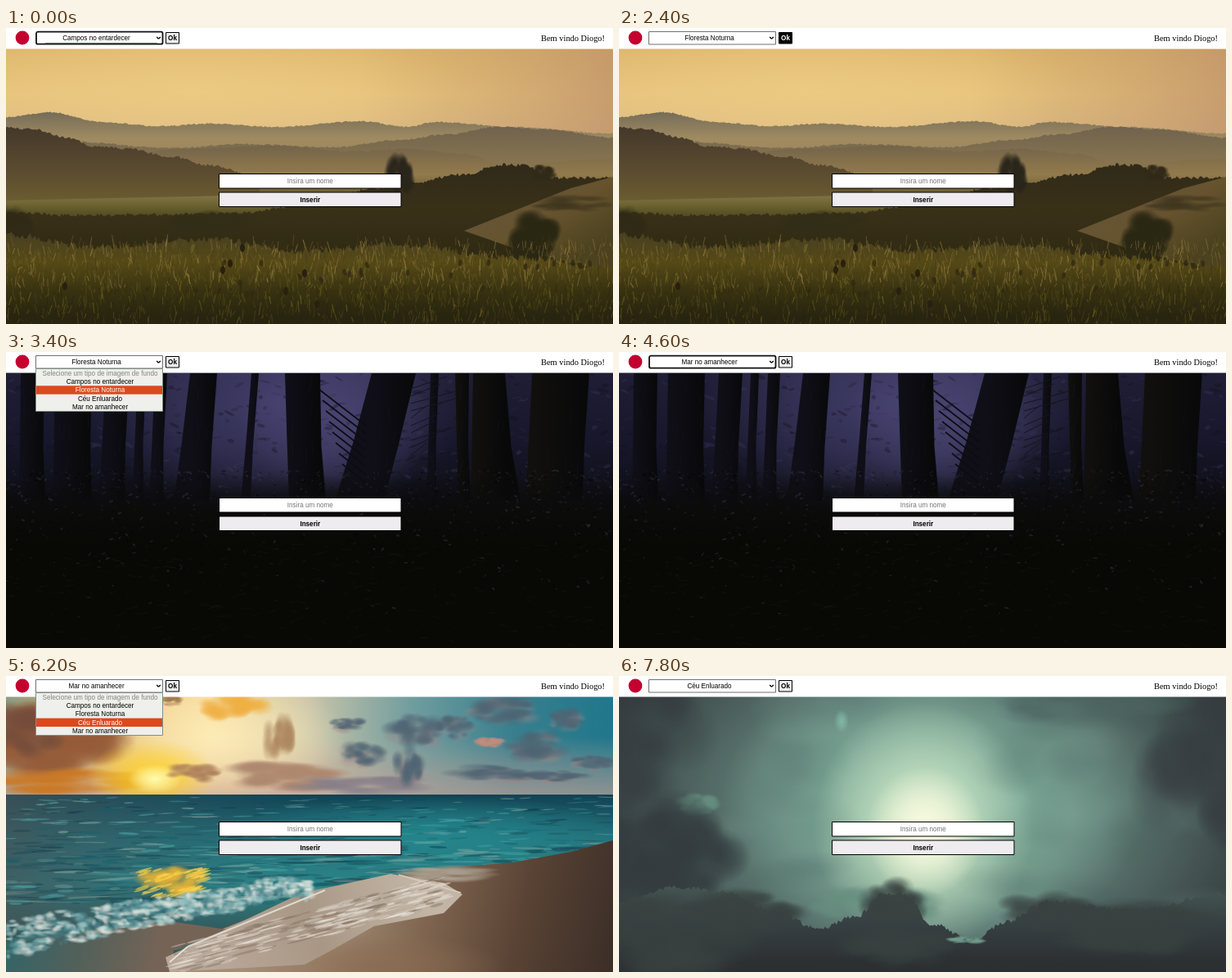
Write an HTML page with a canvas that moves like this. It is 742x362 px and loops after 8.6 s.

```html
<!DOCTYPE html>
<html lang="pt">
<head>
<meta charset="utf-8">
<style>
html, body { margin: 0; width: 100%; height: 100%; overflow: hidden; }
canvas { display: block; }
</style>
</head>
<body>
<canvas id="stage" width="742" height="362"></canvas>
<script>
const W = 742, H = 362, LOOP = 8600, TAU = Math.PI * 2;
const screen = document.getElementById('stage').getContext('2d');
let g = screen, seed = 1;

function rand(a = 0, b = 1) {
  seed = (seed + 0x6D2B79F5) | 0;
  let t = Math.imul(seed ^ seed >>> 15, 1 | seed);
  t = t + Math.imul(t ^ t >>> 7, 61 | t) ^ t;
  return a + (b - a) * ((t ^ t >>> 14) >>> 0) / 4294967296;
}
const pick = list => list[Math.floor(rand(0, list.length))];
const alpha = (color, a) => color + Math.round(a * 255).toString(16).padStart(2, '0');

function linear(x0, y0, x1, y1, ...colors) {
  const fill = g.createLinearGradient(x0, y0, x1, y1);
  colors.forEach((c, i) => fill.addColorStop(i / (colors.length - 1), c));
  return fill;
}
function rect(x, y, w, h, fill) {
  g.fillStyle = fill;
  g.fillRect(x, y, w, h);
}
function shape(points, fill) {
  g.fillStyle = fill;
  g.beginPath();
  for (let i = 0; i < points.length; i += 2) g.lineTo(points[i], points[i + 1]);
  g.closePath();
  g.fill();
}
function ellipse(x, y, rx, ry, fill, turn = 0) {
  g.fillStyle = fill;
  g.beginPath();
  g.ellipse(x, y, rx, ry, turn, 0, TAU);
  g.fill();
}
function line(x0, y0, x1, y1, color, width) {
  g.strokeStyle = color;
  g.lineWidth = width;
  g.beginPath();
  g.moveTo(x0, y0);
  g.lineTo(x1, y1);
  g.stroke();
}
function puff(x, y, rx, ry, color, a = 1) {
  g.save();
  g.translate(x, y);
  g.scale(rx, ry);
  const fill = g.createRadialGradient(0, 0, 0, 0, 0, 1);
  fill.addColorStop(0, alpha(color, a));
  fill.addColorStop(.5, alpha(color, a * .6));
  fill.addColorStop(1, alpha(color, 0));
  ellipse(0, 0, 1, 1, fill);
  g.restore();
}
function cloud(x, y, rx, ry, color, a = .6, count = 28) {
  for (let i = 0; i < count; i++) {
    const turn = rand(0, TAU), r = Math.sqrt(rand()), size = rand(.2, .48);
    puff(x + Math.cos(turn) * r * rx * .8, y + Math.sin(turn) * r * ry * .8, rx * size, ry * size * 1.2, color, a);
  }
}
// Height of a smooth curve through x, y pairs.
function heightAt(points, x) {
  let i = 0;
  while (i < points.length - 4 && x > points[i + 2]) i += 2;
  const [x0, y0, x1, y1] = points.slice(i, i + 4);
  const k = Math.min(1, Math.max(0, (x - x0) / (x1 - x0)));
  return y0 + (y1 - y0) * (1 - Math.cos(k * Math.PI)) / 2;
}
function ridge(points, rough, depth, ...colors) {
  const left = points[0], right = points[points.length - 2], outline = [left, H];
  for (let x = left; x <= right; x += 2) outline.push(x, heightAt(points, x) + rand(-rough, rough));
  const top = Math.min(...points.filter((_, i) => i % 2));
  shape([...outline, right, H], linear(0, top, 0, top + depth, ...colors));
}

function paintField() {
  rect(0, 0, W, H, linear(0, 26, 0, 135, '#dcb66b', '#e6c27c', '#d9b986'));
  puff(230, 75, 330, 90, '#f1cf86', .6);
  rect(430, 26, 312, 110, linear(430, 0, 742, 0, '#c59a6800', '#bd9069bb'));
  ridge([0, 109, 55, 103, 115, 115, 185, 120, 250, 117, 330, 121, 435, 114, 490, 121, 525, 115, 620, 121, 742, 129], .8, 65, '#756c58', '#a08b61', '#9b8259');
  ridge([80, 139, 200, 147, 290, 142, 400, 146, 480, 137, 540, 130, 600, 121, 660, 124, 742, 134], 1, 75, '#70634e', '#84724f', '#927850');
  ridge([100, 158, 240, 147, 330, 144, 420, 151, 490, 148, 560, 154, 610, 167, 742, 160], 1, 70, '#73644a', '#927a4c', '#655932');
  rect(0, 180, W, 182, linear(0, 180, 0, 235, '#6e613500', '#57502b'));
  ridge([0, 121, 35, 124, 75, 134, 110, 145, 145, 147, 200, 157, 250, 168, 310, 182], 1.6, 100, '#44382a', '#594a30', '#6f6030');
  shape([0, 211, 130, 208, 280, 205, 390, 216, 390, 242, 0, 236], linear(0, 205, 0, 238, '#817445', '#625a2a', '#433d20'));
  ridge([0, 225, 80, 229, 190, 228, 280, 226, 380, 215, 450, 196, 490, 190, 560, 179, 605, 167, 635, 168, 665, 183, 742, 183], 2, 110, '#302a19', '#393018', '#302a13');
  cloud(482, 180, 17, 24, '#29251a', 1);
  cloud(657, 177, 16, 10, '#312918', 1);
  shape([742, 182, 690, 196, 630, 220, 560, 248, 620, 269, 742, 300], linear(620, 190, 680, 290, '#665438', '#66532e', '#4c421f'));
  cloud(690, 215, 60, 10, '#3e351e', .5);
  cloud(648, 260, 32, 32, '#292612', .9, 45);
  cloud(250, 241, 55, 17, '#312d18', .7);
  cloud(8, 249, 27, 30, '#2f2915', .8);
  ridge([0, 253, 110, 268, 250, 258, 360, 273, 480, 265, 620, 281, 742, 291], 4, 100, '#494021', '#554916', '#393311', '#272410');
  for (let i = 0; i < 2300; i++) {
    const x = rand(0, W), y = rand(266, 366), length = rand(3, 15);
    const color = y < 320 ? pick(['#91793b', '#6d6028', '#42391a', '#a08747']) : pick(['#36310f', '#64571a', '#272410', '#756620']);
    line(x, y, x + rand(-4, 4), y - length, alpha(color, rand(.25, .7)), rand(.5, 1.3));
  }
  for (let i = 0; i < 28; i++) ellipse(rand(240, 720), rand(285, 340), 2.3, 4, '#302813bb', rand(-.4, .4));
  for (const [x, y] of [[289, 269], [274, 288], [265, 296], [365, 300], [72, 316], [342, 322], [380, 338]]) ellipse(x, y, 3, 5, '#292010');
}

function paintForest() {
  rect(0, 0, W, H, linear(0, 26, 0, 290, '#201e36', '#17162a', '#0c0c0e', '#080805'));
  puff(330, 62, 235, 145, '#45416f', .9);
  puff(405, 78, 120, 100, '#514b7b', .65);
  for (let i = 0; i < 500; i++) {
    const x = rand(0, W), y = rand(26, 180);
    ellipse(x, y, rand(2, 8), rand(.5, 2.5), alpha(pick(['#11111b', '#38365c', '#242337']), .35), rand(-.6, .6));
  }
  // Trunks: left and right edge at the top, then at the foot.
  const trunks = [[18, 47, 16, 48], [60, 105, 57, 105], [122, 151, 113, 145], [161, 171, 154, 168], [182, 197, 175, 192],
    [225, 258, 205, 249], [300, 309, 287, 299], [341, 384, 346, 391], [447, 501, 402, 462], [519, 529, 514, 526],
    [549, 566, 553, 568], [571, 610, 568, 629], [643, 713, 635, 705]];
  trunks.forEach(([a, b, c, d], i) => {
    shape([a, 26, b, 26, (b + d) / 2 - 2, 115, d, 182, c, 182, (a + c) / 2, 110], linear(a, 0, b + 2, 0, i > 9 ? '#11100e' : '#100f18', '#080809'));
    for (let k = 0; k < 8; k++) {
      const x = rand(a + 2, b), y = rand(28, 160);
      line(x, y, x + rand(-3, 2), y + rand(8, 22), '#25222b55', .7);
    }
  });
  for (let i = 0; i < 8; i++) line(440, 90 + i * 10, 383 + i * 4, 46 + i * 13, '#0c0c14', 1.7);
  for (let i = 0; i < 12; i++) line(495, 45 + i * 9, rand(510, 555), 30 + i * 9, '#15141d', 1);
  rect(0, 150, W, 212, linear(0, 150, 0, 235, '#0a0a0c00', '#0b0b0ae8', '#080805'));
  for (let i = 0; i < 900; i++) {
    const y = 145 + 200 * rand() * rand(), x = rand(0, W);
    ellipse(x, y, rand(.7, 3), rand(.4, 1.3), alpha(pick(['#36344a', '#24232b', '#171710', '#050505']), .48), rand(-1, 1));
  }
  for (let i = 0; i < 220; i++) {
    const x = rand(0, W), y = rand(235, 358);
    line(x, y, x + rand(-14, 14), y + rand(-4, 5), '#19170e88', 1);
  }
}

function paintSea() {
  rect(0, 0, W, 146, linear(0, 0, W, 0, '#8c9b83', '#e4bd77', '#f5d798', '#c9c4a9', '#719d9f', '#397f8e', '#20778b'));
  rect(0, 75, W, 71, linear(0, 75, 0, 145, '#d9ad9500', '#c69f95aa'));
  puff(260, 75, 155, 80, '#fff0bd', .8);
  cloud(50, 82, 95, 45, '#955b38', .65, 55);
  cloud(25, 66, 62, 33, '#744c3a', .6);
  cloud(75, 129, 115, 15, '#cb7821', .6);
  puff(178, 121, 80, 44, '#ffd329', .95);
  puff(182, 126, 33, 18, '#fffbb0', 1);
  cloud(280, 38, 42, 18, '#efaf42', .7);
  cloud(333, 73, 20, 30, '#ad875f', .65);
  cloud(200, 30, 18, 7, '#9b704b', .5);
  cloud(230, 118, 35, 12, '#ae815d', .75);
  cloud(335, 122, 78, 18, '#ad876e', .7, 40);
  cloud(440, 134, 100, 12, '#867e88', .6);
  const clouds = [[500, 66, 38, 20], [435, 95, 30, 15], [417, 58, 23, 8], [493, 110, 20, 24], [548, 62, 25, 15], [604, 41, 48, 17],
    [650, 85, 42, 20], [686, 52, 24, 13], [715, 105, 29, 9], [603, 118, 62, 10], [670, 122, 42, 7]];
  for (const [x, y, rx, ry] of clouds) {
    cloud(x, y + 3, rx, ry, '#9d8384', .3, 18);
    cloud(x, y, rx, ry, '#4e6372', .55);
  }
  cloud(592, 81, 22, 7, '#c58c7b', .65);
  rect(0, 145, W, 217, linear(0, 145, 0, 310, '#124253', '#247079', '#2b8588', '#315b5e'));
  rect(0, 145, 350, 160, linear(0, 0, 350, 0, '#465356bb', '#31606800'));
  puff(520, 192, 260, 45, '#249498', .65);
  for (let i = 0; i < 750; i++) {
    const depth = rand(), y = 148 + depth * 132, length = rand(5, 12 + depth * 28);
    ellipse(rand(0, W), y, length, rand(.4, 1 + depth * 1.7), alpha(pick(['#113a48', '#17606d', '#4baaa9', '#8aaaa2', '#1d4f5a']), rand(.25, .55)), rand(-.08, .05));
  }
  cloud(205, 251, 44, 20, '#f0b632', .6);
  for (let i = 0; i < 60; i++) ellipse(rand(165, 245), rand(235, 270), rand(3, 11), 1.3, '#ffd34b99', -.3);
  shape([742, 201, 690, 215, 620, 228, 520, 236, 390, 260, 250, 315, 195, 362, 742, 362], linear(400, 270, 735, 350, '#a48d77', '#806651', '#594334', '#3d2f28'));
  cloud(535, 242, 75, 9, '#aba091', .65);
  puff(450, 355, 160, 40, '#896b50', .8);
  shape([0, 325, 200, 300, 270, 310, 205, 335, 200, 362, 0, 362], linear(0, 310, 180, 362, '#326569', '#52605a', '#756456'));
  shape([200, 362, 195, 344, 260, 314, 360, 266, 470, 242, 535, 253, 558, 267, 535, 290, 450, 306, 395, 337, 365, 353], linear(250, 350, 500, 250, '#b9a89a', '#a99785', '#c2b5a5'));
  for (let i = 0; i < 260; i++) {
    const x = rand(210, 535), y = 347 - (x - 210) * .26 + rand(-18, 18);
    ellipse(x, y, rand(4, 18), rand(.5, 1.8), alpha(pick(['#eee8dd', '#887565', '#d4cbc1']), .5), -.25);
  }
  const crest = [0, 305, 80, 292, 170, 278, 260, 267, 340, 251, 375, 256];
  for (let i = 0; i < 800; i++) {
    const x = rand(0, 372), y = heightAt(crest, x) + rand(-5, 39 - x * .06);
    puff(x, y, rand(3, 10), rand(2, 6), pick(['#d8e1dc', '#8ebfc0', '#5a9499', '#ecebe1', '#457e86']), .65);
  }
  line(200, 350, 222, 331, '#e7dfd4', 2);
  line(222, 331, 390, 262, '#ddd8ce', 2);
  line(480, 243, 556, 265, '#d7cdc0', 1.5);
}

function paintMoon() {
  rect(0, 0, W, H, '#343a3d');
  puff(375, 165, 430, 290, '#7ba99a', .95);
  puff(385, 155, 260, 185, '#8dbfaa', .85);
  puff(372, 182, 135, 150, '#d1e9c6', .95);
  puff(374, 190, 72, 80, '#fffde2', 1);
  for (let i = 0; i < 75; i++) {
    const x = rand(0, W), y = rand(26, 285);
    if (Math.abs(x - 372) > 80) puff(x, y, rand(30, 85), rand(15, 45), pick(['#426158', '#8cb7a4', '#34494a']), .13);
  }
  cloud(25, 75, 95, 90, '#343b3e', .35);
  cloud(725, 105, 95, 115, '#343a3e', .4);
  cloud(570, 35, 110, 28, '#4b6460', .4);
  puff(272, 55, 9, 14, '#86c2ad', .8);
  cloud(97, 156, 28, 14, '#638d7e', .65);
  cloud(50, 220, 95, 65, '#333b3e', .65, 50);
  cloud(310, 282, 80, 28, '#678f80', .5);
  ridge([0, 278, 65, 258, 130, 264, 190, 288, 245, 309, 290, 294, 325, 265, 350, 267, 382, 303, 430, 323, 475, 300, 525, 275, 570, 281, 630, 286, 742, 266], 3, 92, '#455553', '#363f41', '#2c3033');
  for (const [x, y, rx, ry] of [[335, 278, 43, 29], [525, 288, 68, 25], [145, 290, 78, 28], [630, 308, 110, 35], [55, 320, 105, 55], [345, 330, 70, 28]]) cloud(x, y, rx, ry, '#38413f', .55, 38);
  cloud(425, 323, 23, 5, '#729d8d', .6);
  puff(370, 370, 350, 32, '#2b2f32', .85);
}

function render(paint, i) {
  const canvas = document.createElement('canvas');
  canvas.width = W;
  canvas.height = H;
  g = canvas.getContext('2d');
  seed = 40 + i;
  paint();
  return canvas;
}
const scenes = [paintField, paintForest, paintMoon, paintSea].map(render);
g = screen;

const PROMPT = 'Selecione um tipo de imagem de fundo';
const OPTIONS = ['Campos no entardecer', 'Floresta Noturna', 'Céu Enluarado', 'Mar no amanhecer'];
const SANS = '8.15px "Liberation Sans", Arial, sans-serif';
const SERIF = '10.4px "Liberation Serif", "Times New Roman", serif';

// Each step changes part of the state; open holds the highlighted option.
const steps = [
  [0, { scene: 0, chosen: 0, open: -1, focus: true, hover: false }],
  [600, { hover: true }],
  [800, { focus: false }],
  [1100, { hover: false }],
  [1200, { open: 0 }],
  [1500, { open: 1 }],
  [2200, { open: -1, chosen: 1, focus: true }],
  [2400, { hover: true, focus: false }],
  [2500, { scene: 1 }],
  [2900, { hover: false }],
  [3400, { open: 1 }],
  [3600, { open: 2 }],
  [3700, { open: 3 }],
  [4600, { open: -1, chosen: 3, focus: true }],
  [5200, { hover: true }],
  [5300, { focus: false }],
  [5400, { scene: 3 }],
  [5800, { hover: false }],
  [5900, { open: 3 }],
  [6200, { open: 2 }],
  [6500, { open: -1, chosen: 2, focus: true }],
  [7000, { hover: true }],
  [7100, { focus: false }],
  [7300, { scene: 2 }],
  [7600, { hover: false }]
];

function text(string, x, y, color = '#000', font = SANS, align = 'center') {
  g.font = font;
  g.textAlign = align;
  g.fillStyle = color;
  g.fillText(string, x, y);
}
function box(x, y, w, h, fill, border = '#000', width = 1, radius = 0) {
  g.beginPath();
  g.roundRect(x, y, w, h, radius);
  g.fillStyle = fill;
  g.fill();
  g.strokeStyle = border;
  g.lineWidth = width;
  g.stroke();
}

function drawMenu(active) {
  box(36.5, 20.5, 155, 52, '#efefeb', '#819083');
  text(PROMPT, 115, 28.7, '#858585');
  OPTIONS.forEach((label, i) => {
    const y = 31 + i * 10.3;
    if (i === active) rect(37, y, 154, 10.4, '#dc491d');
    text(label, 115, y + 8, i === active ? '#fff' : '#000');
  });
}

function draw(time) {
  const state = Object.assign({}, ...steps.filter(([at]) => at <= time).map(([, change]) => change));
  g.drawImage(scenes[state.scene], 0, 0);

  rect(0, 0, W, 25.5, '#fff');
  ellipse(20, 12, 8.4, 8.4, '#c3002f');
  text('Bem vindo Diogo!', 732, 16, '#000', SERIF, 'right');

  if (state.focus) box(37, 4.7, 154.5, 15, '#fff', '#101010', 1.8, 2);
  else box(36.5, 4.5, 155, 15.5, '#fff', '#70716f');
  text(OPTIONS[state.chosen], 110.5, 15);
  if (time < 100) line(48, 18.8, 185, 18.8, '#2c5930', 1);
  line(184.2, 11, 186.5, 13.2, '#000', 1.3);
  line(186.5, 13.2, 188.8, 11, '#000', 1.3);

  box(195.5, 5.5, 16, 13.5, state.hover ? '#000' : '#efefef');
  text('Ok', 203.5, 15, state.hover ? '#fff' : '#000', 'bold ' + SANS);

  box(260.5, 178.5, 222.5, 17.5, '#fff');
  text('Insira um nome', 371.8, 190, '#757575');
  box(260.5, 201, 222.5, 17.5, '#eeecee');
  text('Inserir', 371.8, 212.7, '#000', 'bold ' + SANS);

  if (state.open >= 0) drawMenu(state.open);
}

const start = performance.now();
function tick() {
  draw((performance.now() - start) % LOOP);
  requestAnimationFrame(tick);
}
tick();
</script>
</body>
</html>
```
